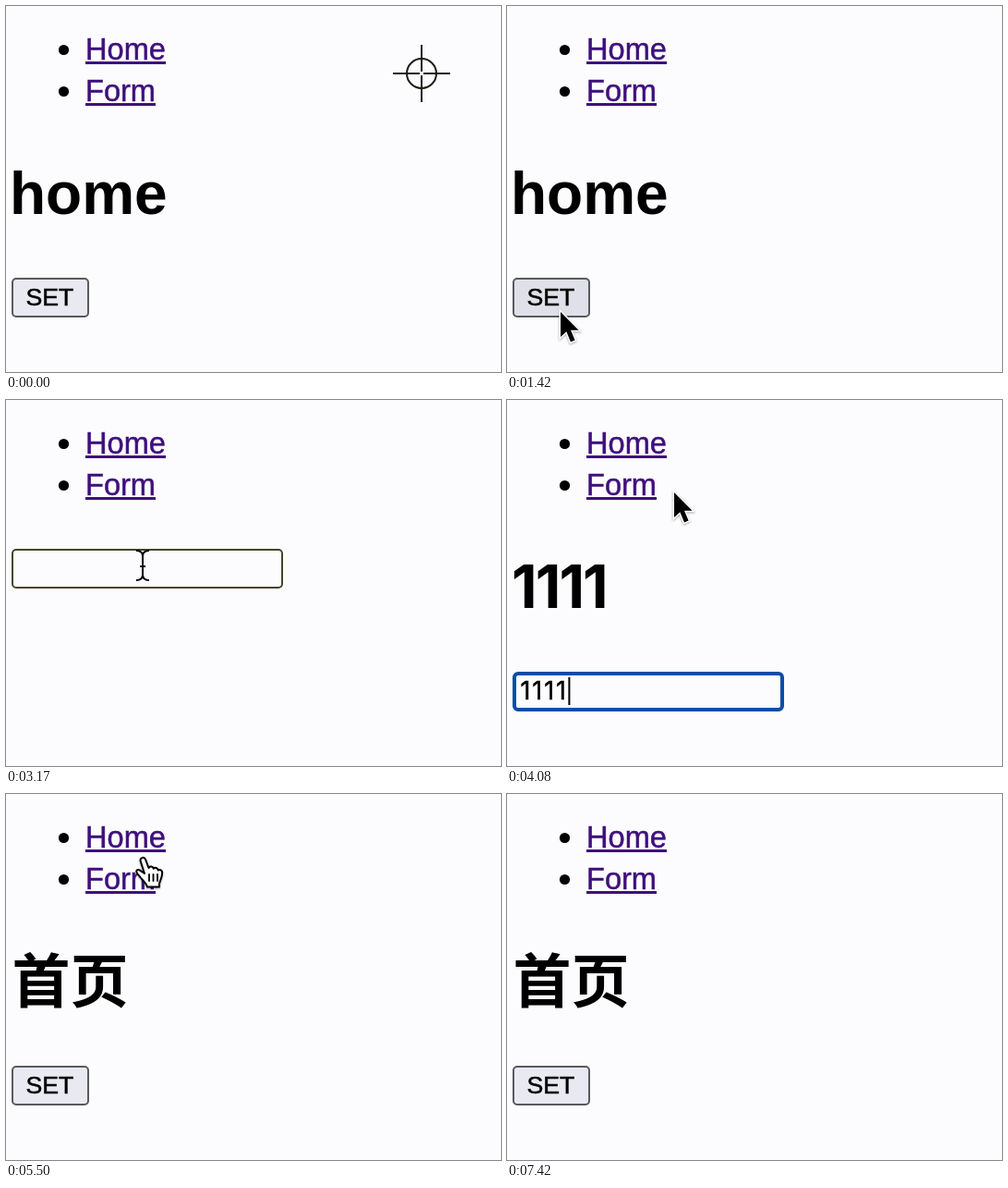
Write an HTML page that moves like this. It is 536 by 396 pixels and loops after 8.26 s.

```html
<!DOCTYPE html>
<html lang="en">
<head>
<meta charset="utf-8">
<title>Home and form</title>
<style>
html, body { margin: 0; width: 100%; height: 100%; overflow: hidden; background: #fcfcfe; }
svg { display: block; width: 536px; height: 396px; }
text { font-family: "Liberation Sans", Arial, sans-serif; }
.link { font-size: 32.6px; }
.link, .label { stroke: currentColor; stroke-width: .5px; }
.title { font-size: 64px; font-weight: 700; }
.cjk { font-family: "Noto Sans CJK SC", "Noto Sans CJK", sans-serif; font-size: 63px; }
.digit { font-family: Inter, sans-serif; }
.label { font-size: 26.7px; }
#homeLink, #formLink { fill: currentColor; }
#hand, #arrow { filter: drop-shadow(0 1.5px 1px rgba(0, 0, 0, .35)); }
</style>
</head>
<body>
<svg viewBox="0 0 536 396">
  <rect width="536" height="396" fill="#fcfcfe"/>
  <circle cx="62.5" cy="47.5" r="5.6"/>
  <circle cx="62.5" cy="92.5" r="5.6"/>
  <g id="homeLink">
    <text class="link" x="86" y="58">Home</text>
    <rect x="86" y="60" width="87" height="3"/>
  </g>
  <g id="formLink">
    <text class="link" x="86" y="103">Form</text>
    <rect x="86" y="105" width="76" height="3"/>
  </g>

  <g id="homePage">
    <text id="english" class="title" x="4" y="225">home</text>
    <text id="chinese" class="title cjk" x="6.5" y="225">首页</text>
    <rect id="button" x="7" y="295" width="82" height="41" rx="4" stroke="#59595e" stroke-width="2"/>
    <text class="label" x="21.5" y="324">SET</text>
  </g>

  <g id="formPage">
    <text id="heading" class="title digit" y="225"></text>
    <g id="field">
      <rect id="box" fill="#fcfcfe"/>
      <text id="typed" class="label digit" y="30"></text>
      <rect id="caret" y="6" width="2" height="30"/>
    </g>
  </g>

  <g id="cross" fill="none" stroke="#1c1c14" stroke-width="2">
    <circle r="16"/>
    <path d="M-31 0H-2M2 0H31M0-31V-2M0 2V31"/>
  </g>
  <path id="arrow" d="M0 0V27L6.3 21.2L11 32.5L15.6 30.5L11 19.8H19.6Z" stroke="#fff" stroke-width="3" paint-order="stroke"/>
  <g id="hand" stroke="#000" stroke-width="2" stroke-linecap="round" stroke-linejoin="round">
    <path fill="#fff" transform="translate(-8.5 -2)" d="M10.5 19L6.3 6C5 2 10 .2 11.6 4L15 13C16 10.8 19.8 11 20.3 13.8C21.5 12 25 12.8 25.2 15.5C27 14.2 30 15.5 29.6 19C29.4 24 27.4 26 26.5 30V33.5H13.5C13 30 8 26 5.5 22.5C3 19.5 1.3 18 1.8 16.3C2.5 14.2 5 15 7 16.6Z"/>
    <path fill="none" stroke-width="1.8" d="M7 18V25M11.5 18V25M16 18V25"/>
  </g>
  <path id="beam" fill="none" stroke="#000" stroke-width="2" d="M-7-16Q0-16 0-10Q0-16 7-16M-7 16Q0 16 0 10Q0 16 7 16M0-11V11M-3 1H3"/>
</svg>
<script>
const $ = id => document.getElementById(id);
const LOOP = 8260, RATE = 12;
const KINDS = ['cross', 'arrow', 'hand', 'beam'];

// step, pointer kind, hotspot x and y
const path = [
  [0, 'cross', 450, 73], [2, 'arrow', 450, 73], [3, 'arrow', 450, 73],
  [4, 'arrow', 384, 74], [5, 'arrow', 384, 74], [6, 'arrow', 300, 90],
  [8, 'arrow', 165, 147], [10, 'hand', 120, 102], [11, 'hand', 120, 102],
  [12, 'arrow', 108, 172], [14, 'arrow', 80, 300], [15, 'arrow', 66, 340],
  [17, 'arrow', 58, 331], [20, 'arrow', 58, 331], [21, 'arrow', 90, 290],
  [23, 'arrow', 226, 130], [24, 'arrow', 195, 50], [25, 'hand', 155, 68],
  [30, 'hand', 143, 84], [31, 'hand', 140, 87], [35, 'hand', 140, 87],
  [36, 'arrow', 144, 110], [38, 'beam', 148, 179], [41, 'none', 148, 179],
  [46, 'arrow', 150, 178], [48, 'arrow', 186, 125], [49, 'arrow', 181, 100],
  [50, 'hand', 160, 75], [51, 'hand', 146, 61], [63, 'hand', 146, 61],
  [66, 'hand', 148, 69], [72, 'hand', 142, 97], [79, 'hand', 142, 97],
  [84, 'hand', 134, 55], [87, 'hand', 134, 55], [88, 'hand', 146, 73],
  [89, 'none', 146, 73]
];

const within = (n, a, b) => n >= a && n < b;
const show = (id, on) => $(id).setAttribute('display', on ? 'inline' : 'none');
const set = (id, attrs) => {
  for (const key in attrs) $(id).setAttribute(key, attrs[key]);
};
const paint = (id, pressed) => { $(id).style.color = pressed ? '#e00000' : '#3f107c'; };

function pointer(n) {
  let i = path.length - 1;
  while (path[i][0] > n) i--;
  const [start, kind, x, y] = path[i];
  const next = path[i + 1] || path[i];
  const k = next[0] > start ? (n - start) / (next[0] - start) : 0;
  return { kind, x: x + (next[2] - x) * k, y: y + (next[3] - y) * k };
}

function digits(id, count, x, gap) {
  $(id).textContent = '1'.repeat(count);
  $(id).setAttribute('x', Array.from({ length: count }, (_, i) => x + i * gap).join(' ') || x);
}

function drawForm(n) {
  const count = within(n, 41, 59) ? [41, 42, 45, 47].filter(s => n >= s).length : 0;
  const focus = within(n, 39, 59);
  const w = focus ? 4 : 2;
  digits('heading', count, 5, 25.7);
  digits('typed', count, 14.5, 12.85);
  set('field', { transform: `translate(0 ${count ? 294 : 161})` });
  set('box', {
    x: 6 + w / 2, y: w / 2, width: 294 - w, height: 43 - w,
    rx: 4, stroke: focus ? '#0a4da8' : '#45452c', 'stroke-width': w
  });
  set('caret', { x: 15 + count * 12.85 });
  show('caret', focus && n < 53);
}

function draw(t) {
  const n = Math.floor((t + 5) * RATE / 1000);
  const form = within(n, 34, 59) || within(n, 74, 86);
  show('formPage', form);
  show('homePage', !form);
  show('english', !form && n < 18);
  show('chinese', !form && n >= 18);
  set('button', { fill: within(n, 14, 21) ? '#e0e0e8' : '#e9e9f1' });
  paint('homeLink', within(n, 57, 59) || n === 85);
  paint('formLink', within(n, 32, 34) || n === 73);
  drawForm(n);

  const p = pointer(n);
  for (const kind of KINDS) show(kind, kind === p.kind);
  if (p.kind !== 'none') set(p.kind, { transform: `translate(${p.x} ${p.y})` });
}

const begin = performance.now();
function tick() {
  draw((performance.now() - begin) % LOOP);
  requestAnimationFrame(tick);
}
tick();
</script>
</body>
</html>
```
